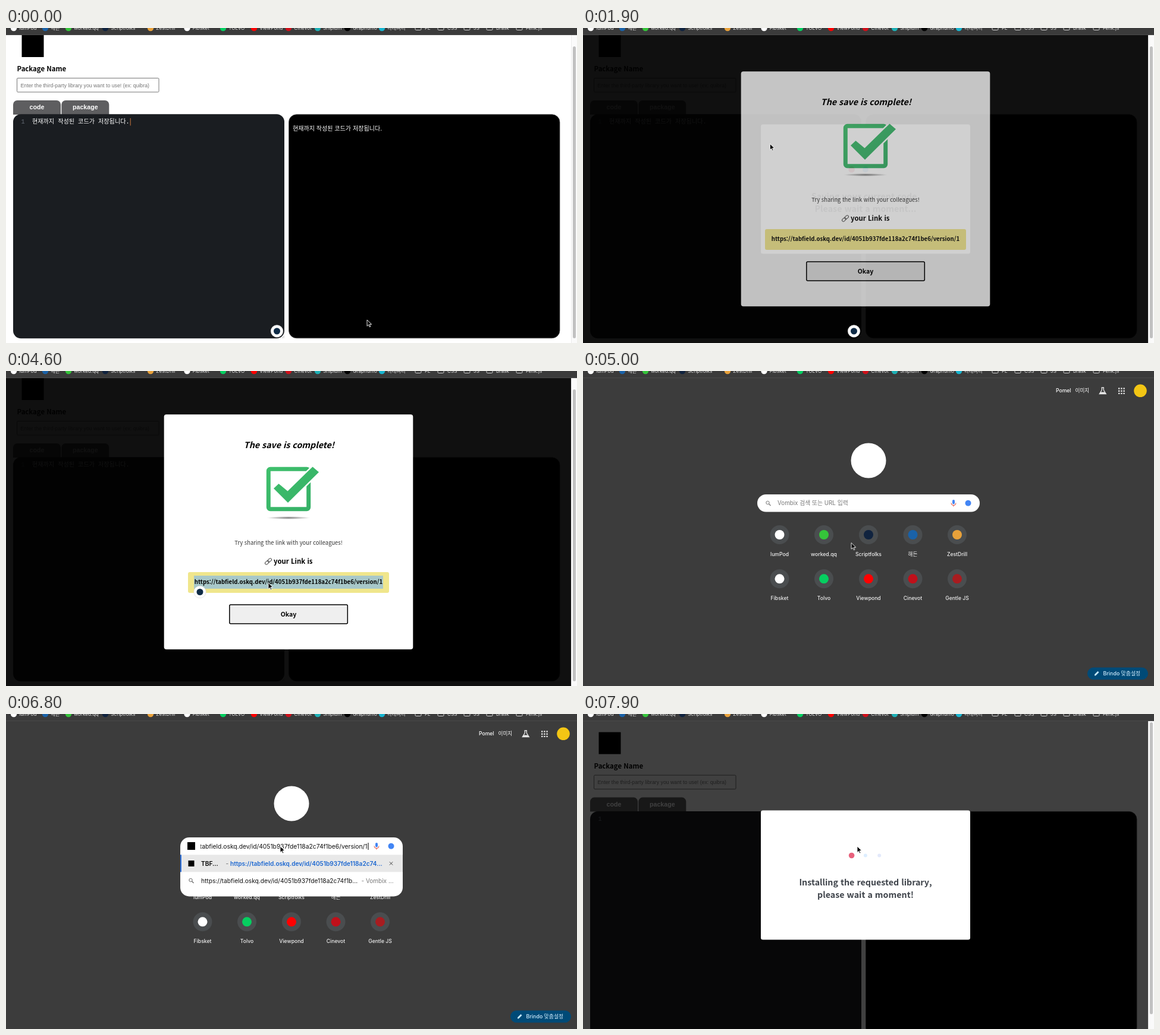
Animation of 960 by 531 pixels, one loop 8000 ms. Source, as an HTML page:

```html
<!DOCTYPE html>
<html lang="ko">
<head>
<meta charset="utf-8">
<title>Saving and sharing code</title>
<style>
html,body{margin:0;width:100%;height:100%;overflow:hidden;background:#fff}
svg{display:block;width:100vw;height:100vh}
text{white-space:pre}
.ui{font-family:Inter,'Noto Sans CJK KR',sans-serif}
.kr{font-family:'Noto Sans CJK KR','Noto Sans CJK','Noto Sans',sans-serif}
.ar{font-family:'Liberation Sans',Arial,sans-serif}
.mono{font-family:'Liberation Mono','Noto Sans CJK KR',monospace}
.b{font-weight:700}
.s{font-weight:600}
.m{font-weight:500}
</style>
</head>
<body>
<svg id="stage" viewBox="0 0 960 531"></svg>
<script>
const stage = document.getElementById('stage');
const LINK = 'https://tabfield.oskq.dev/id/4051b937fde118a2c74f1be6/version/1';
const SAVED = '현재까지 작성된 코드가 저장됩니다.';

// Markup helpers
const text = (x, y, s, size, cls, fill = '#000', more = '') =>
  `<text x="${x}" y="${y}" font-size="${size}" class="${cls}" fill="${fill}" ${more}>${s}</text>`;
const mid = (x, y, s, size, cls, fill, more = '') =>
  text(x, y, s, size, cls, fill, 'text-anchor="middle" ' + more);
const rect = (x, y, w, h, fill, r = 0, more = '') =>
  `<rect x="${x}" y="${y}" width="${w}" height="${h}" rx="${r}" fill="${fill}" ${more}/>`;
const circle = (x, y, r, fill, more = '') =>
  `<circle cx="${x}" cy="${y}" r="${r}" fill="${fill}" ${more}/>`;
const path = (d, fill, more = '') => `<path d="${d}" fill="${fill}" ${more}/>`;
const line = (d, stroke, w = 1, more = '') =>
  path(d, 'none', `stroke="${stroke}" stroke-width="${w}" ${more}`);
const group = (id, body, more = '') => `<g id="${id}" ${more}>${body}</g>`;

function bookmarks() {
  const sites = [
    [13, 'lumPod', '#fff'], [66, '해든', '#1a62a8'], [105, 'worked.qq', '#35c43a'],
    [167, 'Scriptfolks', '#10233f'], [243, 'ZestDrill', '#e8a13a'], [304.5, 'Fibsket', '#fff'],
    [365, 'TOLVO', '#06cf60'], [417, 'ViewPond', '#f00'], [475, 'Cinevot', '#d0101a'],
    [524, 'Shiplum', '#1eb0b5'], [574, 'Graphumo', '#000'], [632, '나래벼리', '#18b5d0']
  ];
  const folders = [[693, 'FE'], [731, 'CSS'], [775, 'JS'], [813, 'Brask'], [863, 'Fenk.js']];
  return rect(0, 0, 960, 12, '#3b3b3b') + rect(0, 11, 960, 1, '#4a4a4a') +
    sites.map(([x, s, c]) => circle(x, 0, 5.2, c) + text(x + 9.3, 3.2, s, 8.2, 'ui', '#e3e3e3')).join('') +
    folders.map(([x, s]) => rect(x - 5, -5, 10, 8.5, 'none', 1.5, 'stroke="#d0d0d0"') +
      text(x + 11, 3.2, s, 8.2, 'ui', '#e3e3e3')).join('');
}

const tab = (x, s) => path(`M${x} 146v-17a7 7 0 0 1 7-7h66a7 7 0 0 1 7 7v17z`, '#5e5e60') +
  mid(x + 40, 137, s, 10.67, 'ar b', '#fff');

function editorPage(id, dy, wide, saved) {
  const w = wide ? 461 : 456, out = 19.5 + w;
  return group(id, rect(0, 0, 960, 531, '#fff') + `<g transform="translate(0 ${dy})">` +
    (wide ? '' : rect(26.5, 12, 37, 37, '#000')) +
    text(18.5, 73, 'Package Name', 11.4, 'kr b') +
    rect(18.5, 84.5, 238.5, 23.5, '#fff', 1.5, 'stroke="#777"') +
    text(24.5, 99.5, 'Enter the third-party library you want to use! (ex: quibra)', 8.75, 'ar', '#757575') +
    tab(12, 'code') + tab(93.3, 'package') +
    rect(12, 145.3, w, 378, '#1a1d21', 13) +
    rect(out, 145.8, w - .5, 377, '#000', 13, 'stroke="#444" stroke-width=".8"') +
    line(`M${w + 8} 523l4-4M${w + 10.5} 523l1.5-1.5`, '#888', .6) +
    text(25.5, 161, '1', 10.1, 'mono', '#646b75') +
    (saved ? text(44, 161, SAVED, 10.1, 'mono', '#fff') + rect(208.7, 152, 1, 12.5, '#c9763c', 0, 'id="caret"') +
      text(482, 172.5, SAVED, 10.05, 'ui', '#fff') : '') +
    '</g>' + (wide ? '' : rect(950, 12, 10, 519, '#fafafa') + rect(950, 12, .7, 519, '#e4e4e4') +
      rect(953, saved ? 31 : 14, 5, 492, '#c1c1c1', 2.5)));
}

const shade = () => rect(0, 12, 950, 519, '#000', 0, 'opacity=".75"');

const waitBox = (id, a, b) => group(id, shade() + rect(299, 162.6, 352, 217.8, '#fff', 3.5) +
  ['crimson', 'dodgerblue', 'royalblue'].map((c, i) => circle(451.6 + i * 23.3, 238.5, 5, c, 'class="dot"')).join('') +
  mid(475, 288.5, a, 14.25, 'kr b', '#3f444b') + mid(475, 309.5, b, 14.25, 'kr b', '#3f444b'));

function doneBox() {
  const chain = x => rect(x, -2.2, 7.4, 4.4, 'none', 2.2, 'stroke="#555" stroke-width="1.1"');
  return group('doneShade', shade()) + group('done',
    rect(265.7, 73.3, 418.6, 396, '#fff', 4) +
    mid(476, 129.5, 'The save is complete!', 14.25, 'kr b', '#000', 'font-style="italic"') +
    rect(441.3, 165.3, 67.4, 67.4, 'none', 3, 'stroke="url(#green)" stroke-width="7"') +
    path('M450 198l8.5-8 15 12.5L515.5 161.5l10.5 9L474 222z', 'url(#green)',
      'stroke="#fff" stroke-width="5" paint-order="stroke"') +
    `<ellipse cx="475" cy="247.5" rx="37" ry="2.5" fill="url(#soft)"/>` +
    mid(475, 292.5, 'Try sharing the link with your colleagues!', 9.4, 'kr', '#333') +
    `<g transform="translate(441 321) rotate(-42)">${chain(-6.6)}${chain(-.8)}</g>` +
    text(450, 325, 'your Link is', 11.4, 'kr b') +
    rect(306, 339, 338, 35, '#f0e68c', 3) +
    rect(316, 345, 318, 22, '#a8c8c9', 0, 'id="selection"') +
    mid(475, 359.3, LINK, 9.65, 'kr b') +
    rect(375.8, 394, 198.5, 32, '#efefef', 2, 'stroke="#000" stroke-width="1.5"') +
    mid(475, 414.3, 'Okay', 10.5, 'kr b'));
}

const glass = (x, y, c) => circle(x, y, 2.7, 'none', `stroke="${c}"`) + line(`M${x + 2} ${y + 2}l3 3`, c, 1.2);

function newTab() {
  const columns = [330.5, 405, 480, 554.5, 629];
  const row = (y, items) => items.map(([s, c], i) => circle(columns[i], y, 16, '#4a4d4f') +
    circle(columns[i], y, 8, c) + mid(columns[i], y + 35.5, s, 8.6, 'ui m', '#f0f0f0')).join('');
  let apps = '';
  for (let i = 0; i < 9; i++) apps += rect(900 + i % 3 * 4.2, 28.3 + (i / 3 | 0) * 4.2, 2.4, 2.4, '#e8e8e8', .6);
  const tools = rect(621, 217, 4, 7.5, '#4285f4', 2) +
    line('M619 222.5a4 4 0 0 0 8 0M623 226.5v2', '#e0483c') + circle(647.5, 222.8, 5, '#4285f4');
  const typing = rect(293, 208, 374, 99.5, '#fff', 15) + rect(293, 237.3, 374, 29, '#e8e8e8') +
    rect(293, 237.3, 2, 29, '#2f73e0') +
    rect(305, 216, 13, 13, '#000') + rect(306.5, 247, 10, 10, '#000') +
    `<g clip-path="url(#field)">${text(607.5, 226.5, LINK, 10.3, 'ui', '#111', 'text-anchor="end"')}</g>` +
    rect(608.5, 217, 1, 12, '#000') +
    text(328, 255.7, 'TBF...', 10.2, 'ui s') + text(369.5, 255.7, '-', 10.2, 'ui', '#666') +
    text(377, 255.7, LINK.slice(0, 48) + '...', 10.1, 'ui s', '#1a66d0') +
    line('M644.8 249.2l5.4 5.4m0-5.4l-5.4 5.4', '#444') + glass(310.5, 280, '#666') +
    text(328, 284.8, LINK.slice(0, 51) + '...', 10.2, 'ui', '#111') +
    text(597.5, 284.8, '- Vombix ...', 10, 'ui', '#777');
  const idle = rect(293, 208, 374, 29.5, '#fff', 14.7) + glass(310.5, 222, '#777') +
    text(327, 226, 'Vombix 검색 또는 URL 입력', 9.8, 'ui', '#777');
  return group('newTab', rect(0, 0, 960, 531, '#3c3c3c') +
    text(795, 36.3, 'Pomel', 8.6, 'ui m', '#fff') + text(827.5, 36.3, '이미지', 8.6, 'ui m', '#fff') +
    line('M871.5 28h4.5M872.3 28v4l-4 6.5h11l-4-6.5v-4', '#e8e8e8', 1.3) +
    path('M870.5 35.5h6.5l1.5 3h-10z', '#e8e8e8') + apps +
    circle(937, 33.3, 10.8, '#f3c614') + circle(480, 151, 29.5, '#fff') +
    row(276, [['lumPod', '#fff'], ['worked.qq', '#35c43a'], ['Scriptfolks', '#10233f'], ['해든', '#1a62a8'], ['ZestDrill', '#e8a13a']]) +
    row(350.3, [['Fibsket', '#fff'], ['Tolvo', '#06cf60'], ['Viewpond', '#f00'], ['Cinevot', '#c0101a'], ['Gentle JS', '#a81c20']]) +
    group('idle', idle) + group('typing', typing) + tools +
    rect(848, 499.7, 102, 20.6, '#004a77', 10.3) +
    path('M860 513.5v-2l5.5-5.5 2 2-5.5 5.5z', '#c2e7ff') +
    text(874.5, 513.2, 'Brindo 맞춤설정', 8.9, 'ui m', '#d3eeff'));
}

stage.innerHTML = `<defs>
  <linearGradient id="green" gradientUnits="userSpaceOnUse" x1="440" y1="160" x2="510" y2="236">
    <stop stop-color="#3fc06c"/><stop offset="1" stop-color="#35b066"/></linearGradient>
  <radialGradient id="soft"><stop stop-color="#777"/><stop offset="1" stop-color="#fff"/></radialGradient>
  <clipPath id="field"><rect x="327" y="210" width="283" height="26"/></clipPath></defs>` +
  editorPage('work', 0, false, true) +
  waitBox('saving', 'Saving your current code.', 'Please wait a moment...') + doneBox() +
  group('bubble', circle(0, 0, 10.3, '#fff', 'stroke="#ccc" stroke-width=".5"') + circle(0, 0, 5.5, '#0f2b46')) +
  newTab() + editorPage('loading', -18.4, true, false) + editorPage('fresh', 18.6, false, false) +
  waitBox('installing', 'Installing the requested library,', 'please wait a moment!') +
  bookmarks() +
  group('arrow', path('M0 0v10.5l2.5-2.3 1.7 3.8 1.7-.7-1.7-3.7h3.5z', '#000', 'stroke="#fff" stroke-width=".9"')) +
  group('beam', ['#fff', '#000'].map((c, i) =>
    line('M-2.5-5.5q2.5 0 2.5 1.5v8q0 1.5-2.5 1.5M2.5-5.5q-2.5 0-2.5 1.5v8q0 1.5 2.5 1.5', c, 2.2 - i * 1.3)).join(''));

const part = {};
stage.querySelectorAll('[id]').forEach(e => part[e.id] = e);
const dots = [...stage.querySelectorAll('.dot')];

const clamp = v => Math.max(0, Math.min(1, v));
const ease = v => { v = clamp(v); return v * v * (3 - 2 * v); };
const show = (id, on) => part[id].style.display = on ? '' : 'none';
const fade = (id, t, from, to, end) => {
  show(id, t >= from && t < end);
  part[id].setAttribute('opacity', clamp((t - from) / (to - from)));
};
const place = (id, x, y) => part[id].setAttribute('transform', `translate(${x} ${y})`);

// Pointer stops: time, x, y
const stops = [[0, 607, 492], [100, 607, 492], [800, 304, 182], [1800, 304, 182],
  [2400, 441, 356], [4700, 441, 357], [5300, 461, 223], [8000, 461, 223]];

function pointer(t) {
  const i = stops.findIndex(s => s[0] > t);
  const [t0, x0, y0] = stops[i - 1], [t1, x1, y1] = stops[i];
  const k = ease((t - t0) / (t1 - t0));
  return [x0 + (x1 - x0) * k, y0 + (y1 - y0) * k];
}

function draw(t) {
  const TAB = 4750, LOAD = 7000, READY = 7200;
  show('work', t < TAB);
  show('caret', t < 530 || t >= 1000 && t < 1800);
  fade('saving', t, 950, 1150, TAB);
  fade('doneShade', t, 1650, 1800, TAB);
  fade('done', t, 1750, 1950, TAB);
  show('selection', t >= 3300);
  show('bubble', t < TAB);
  place('bubble', ...(t < 3500 ? [455.5, 511] : [326, 372.5]));

  show('newTab', t >= TAB && t < LOAD);
  show('idle', t < 5600);
  show('typing', t >= 5600);
  show('loading', t >= LOAD && t < READY);
  show('fresh', t >= READY);
  fade('installing', t, 7300, 7500, 8000);

  dots.forEach((d, i) => {
    const p = clamp(.5 + .8 * Math.cos(2 * Math.PI * ((t - 858) / 1040 - .2 * (i % 3))));
    d.setAttribute('r', 3 + 2.3 * Math.sqrt(p));
    d.setAttribute('opacity', .15 + .85 * p);
  });

  const beam = t >= 2350 && t < 3650 || t >= 5250 && t < 6700;
  const [x, y] = pointer(t);
  show('beam', beam);
  show('arrow', !beam);
  place('arrow', x, y);
  place('beam', x + 1, y);
}

function tick() {
  draw(performance.now() % 8000);
  requestAnimationFrame(tick);
}
tick();
</script>
</body>
</html>
```
